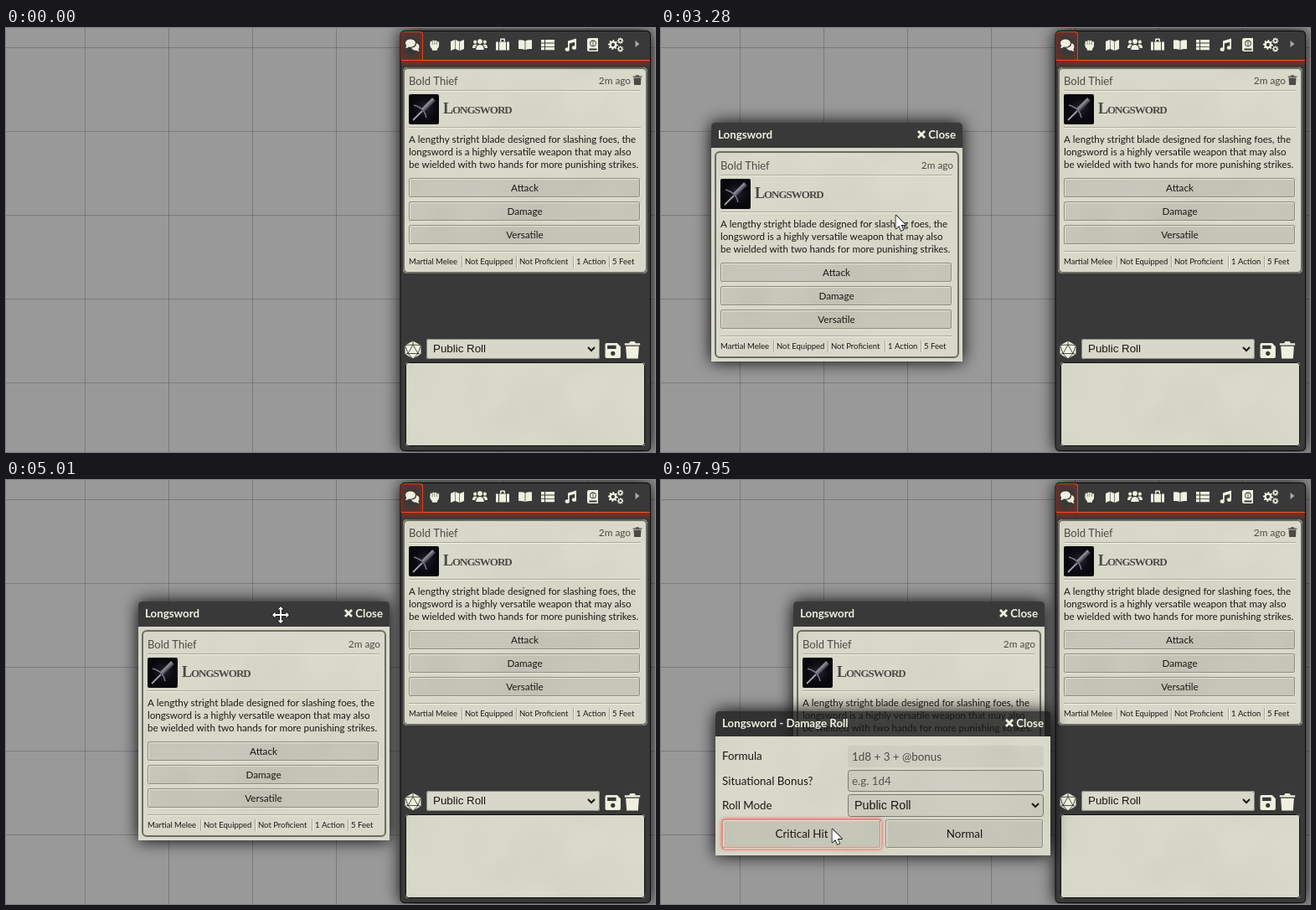
An HTML page with a canvas for the animation above (8 s loop, 775 by 506 pixels).

```html
<!DOCTYPE html>
<html lang="en">
<head>
<meta charset="utf-8">
<title>Chat card pop-out</title>
<style>
html, body { margin: 0; width: 100%; height: 100%; overflow: hidden; background: #999; }
canvas { display: block; }
</style>
</head>
<body>
<canvas id="stage" width="775" height="506"></canvas>
<script>
const ctx = document.getElementById('stage').getContext('2d');
const LOOP = 8000;
const CREAM = '#f0f0e0', INK = '#191813', SOFT = '#4b4a44', PANEL = '#393939';
const SANS = 'Lato, "Open Sans", sans-serif', ARIAL = '"Liberation Sans", Arial, sans-serif';

// ---- timing ----
// Progress in n equal jumps, the first at a and the last at b.
function ticks(t, a, b, n) {
  if (t < a) return 0;
  if (n < 2 || t >= b) return 1;
  return (Math.floor((t - a) / (b - a) * (n - 1) + 0.1) + 1) / n;
}

function along(pts, p) {
  const s = p * (pts.length - 1), i = Math.min(Math.floor(s), pts.length - 2), f = s - i;
  return [0, 1].map(k => Math.round(pts[i][k] + (pts[i + 1][k] - pts[i][k]) * f));
}

function place(moves, t) {
  let at = moves[0][3][0];
  for (const [a, b, n, pts] of moves) if (t >= a) at = along(pts, ticks(t, a, b, n));
  return at;
}

const pointerMoves = [
  [390, 870, 6, [[640, 331], [642, 175]]],
  [1750, 2330, 7, [[642, 175], [531, 317]]],
  [3090, 3860, 9, [[531, 317], [280, 223], [245, 150], [229, 114]]],
  [3950, 4050, 2, [[229, 114], [237, 128]]],
  [4550, 4550, 1, [[237, 128], [261, 128]]],
  [4630, 5010, 5, [[261, 128], [328, 161]]],
  [5600, 6080, 6, [[328, 161], [323, 352]]],
  [6280, 6280, 1, [[323, 352], [323, 353]]],
  [7560, 7950, 5, [[323, 353], [204, 416]]]
];
const popoutMoves = [
  [4550, 4550, 1, [[60, 113], [84, 113]]],
  [4630, 5010, 5, [[84, 113], [158, 145]]]
];

let mouse = [0, 0];
const hit = (x, y, w, h) => mouse[0] >= x && mouse[0] < x + w && mouse[1] >= y && mouse[1] < y + h;

// ---- drawing helpers ----
function text(s, x, y, size, color = INK, o = {}) {
  ctx.font = `${o.weight || 400} ${size}px ${o.family || SANS}`;
  ctx.textAlign = o.align || 'left';
  ctx.fillStyle = color;
  ctx.fillText(s, x, y);
}

function box(x, y, w, h, r) {
  ctx.beginPath();
  ctx.roundRect(x, y, w, h, r);
}

function fillBox(x, y, w, h, r, color) {
  box(x, y, w, h, r);
  ctx.fillStyle = color;
  ctx.fill();
}

function lineBox(x, y, w, h, r, color, width = 1) {
  box(x + width / 2, y + width / 2, w - width, h - width, r);
  ctx.strokeStyle = color;
  ctx.lineWidth = width;
  ctx.stroke();
}

// Shadow that falls only outside the box.
function glow(x, y, w, h, r, blur, color) {
  ctx.save();
  ctx.beginPath();
  ctx.rect(0, 0, 775, 506);
  ctx.roundRect(x, y, w, h, r);
  ctx.clip('evenodd');
  ctx.shadowColor = color;
  ctx.shadowBlur = blur;
  fillBox(x, y, w, h, r, '#000');
  ctx.restore();
}

function strokePath(d, x, y, color, width) {
  ctx.save();
  ctx.translate(x, y);
  ctx.strokeStyle = color;
  ctx.lineWidth = width;
  ctx.stroke(new Path2D(d));
  ctx.restore();
}

function groove(x, y, w) {
  ctx.fillStyle = '#aaa99b';
  ctx.fillRect(x, y, w, 1);
  ctx.fillStyle = '#eeeee2';
  ctx.fillRect(x, y + 1, w, 1);
}

const parchment = (() => {
  const c = document.createElement('canvas'), g = c.getContext('2d');
  c.width = 420;
  c.height = 300;
  g.fillStyle = '#d9d9ca';
  g.fillRect(0, 0, 420, 300);
  let seed = 11;
  const rnd = () => (seed = seed * 16807 % 2147483647) / 2147483647;
  for (let i = 0; i < 90; i++) {
    const x = rnd() * 420, y = rnd() * 300, r = 15 + rnd() * 40;
    const tone = i % 2 ? '255,255,240' : '130,130,105';
    const fade = g.createRadialGradient(x, y, 0, x, y, r);
    fade.addColorStop(0, `rgba(${tone},.035)`);
    fade.addColorStop(1, `rgba(${tone},0)`);
    g.fillStyle = fade;
    g.fillRect(x - r, y - r, 2 * r, 2 * r);
  }
  return c;
})();

function paper(x, y, w, h, r = 0) {
  ctx.save();
  box(x, y, w, h, r);
  ctx.clip();
  ctx.drawImage(parchment, x, y);
  ctx.restore();
}

// ---- icons on a 16 x 16 grid ----
const disc = (x, y, r) => `M${x - r} ${y}a${r} ${r} 0 1 1 ${2 * r} 0a${r} ${r} 0 1 1 ${-2 * r} 0z`;

function cog(x, y, r) {
  let d = '';
  for (let i = 0; i < 32; i++) {
    const a = i * Math.PI / 16, q = i % 4 < 2 ? r : r * 0.72;
    d += `${i ? 'L' : 'M'}${x + q * Math.cos(a)} ${y + q * Math.sin(a)}`;
  }
  return d + 'z' + disc(x, y, r * 0.35);
}

const shapes = {
  chat: 'M0 6a6 4.6 0 1 1 4.2 4.4Q2 12 0 12Q1 10.5 1.2 8.8Q0 7.6 0 6zM7 11.6A6 4.6 0 0 0 13 6q3.6 1.2 3.4 4.2q0 1.8-1 3l1 2.6q-2.6 0-3.6-1.2q-4 .6-5.8-3z',
  fist: 'M2 3h2.4v5h.6v-6h2.6v6h.6v-5.6h2.6v5.6h.6v-4.4h2.4v5.6q0 3-2.4 4.4v2h-7v-2q-3-2.4-3-5z',
  map: 'M0 4l5-2v11l-5 2zM5.6 2l4.8 2v11l-4.8-2zM11 4l5-2v11l-5 2z',
  users: disc(8, 4.5, 2.6) + disc(2.8, 5, 1.8) + disc(13.2, 5, 1.8) +
    'M3.8 13.4q0-5.4 4.2-5.4t4.2 5.4zM0 11.5q0-4 3-4q1.5 0 2 .8q-2 1.2-2.2 3.2zM16 11.5q0-4-3-4q-1.5 0-2 .8q2 1.2 2.2 3.2z',
  case: 'M5 4v-2.4q0-1 1-1h4q1 0 1 1v2.4h-1.5v-2h-3v2zM0 4.6h3v10h-3zM4 4.6h8v10h-8zM13 4.6h3v10h-3z',
  book: 'M0 2.5q5-.6 7.6 1v10.5q-3-1.4-7.6-1zM16 2.5q-5-.6-7.6 1v10.5q3-1.4 7.6-1z',
  list: [2, 6.4, 10.8].map(y => `M0 ${y}h4v3.5h-4zM5 ${y}h11v3.5h-11z`).join(''),
  music: 'M5 3.4L15 .6V11.4a2.6 2.2 0 1 1-1.8-2V4.8L6.8 6.6V13.4a2.6 2.2 0 1 1-1.8-2z',
  atlas: 'M3.5 0h10.5v16h-10.5q-2.5 0-2.5-2.5v-11q0-2.5 2.5-2.5zM3.5 12.6h9v1.8h-9z' +
    disc(8, 6.4, 3.8) + disc(8, 6.4, 2.9) + 'M7.6 3.5h.8v5.8h-.8z',
  cogs: cog(5.2, 8, 5.4) + cog(13, 3.8, 3.4) + cog(13, 12.4, 3.4),
  caret: 'M5 3l6 5l-6 5z',
  trash: 'M1 2h4l1-1.6h4l1 1.6h4v1.8h-14zM2 4.8h12l-.8 11.2h-10.4z',
  save: 'M1.5 .5h10.5l3.5 3.5v10q0 1.5-1.5 1.5h-12.5q-1.5 0-1.5-1.5v-12q0-1.5 1.5-1.5zM2.2 2.7h8.8v3.6h-8.8z' + disc(7.8, 10.8, 2.2),
  popout: 'M2 .5h13.5v13.5q0 1.5-1.5 1.5h-13.5v-6h2.2v3.8h10.6v-10.6h-11.3zM5 4.2h6.8v6.8l-2.2-2.2l-4.2 4.2l-2-2l4.2-4.2z'
};
for (const k in shapes) shapes[k] = new Path2D(shapes[k]);

function icon(name, cx, cy, size, color) {
  ctx.save();
  ctx.translate(cx - size / 2, cy - size / 2);
  ctx.scale(size / 16, size / 16);
  ctx.fillStyle = color;
  ctx.fill(shapes[name], 'evenodd');
  ctx.restore();
}

function eyeOff(x, y) {
  strokePath('M-7 0Q0-9 7 0Q0 9-7 0z', x, y, CREAM, 2);
  ctx.fillStyle = CREAM;
  ctx.fill(new Path2D(disc(x, y, 2.5)));
  strokePath('M-7-7L9 6', x, y, '#23221d', 2);
  strokePath('M-8-6.5L8 6.5', x, y, CREAM, 2);
}

function d20(x, y) {
  ctx.fillStyle = CREAM;
  ctx.fill(new Path2D(`M${x} ${y - 10.5}l9.5 5.2v10.6l-9.5 5.2l-9.5-5.2v-10.6z`));
  strokePath('M0-6L6 4.5H-6zM0-11V-6L9.5-5.5L6 4.5L9.5 5.5M0-6L-9.5-5.5L-6 4.5L-9.5 5.5M-6 4.5L0 11L6 4.5', x, y, PANEL, 0.9);
}

const chevron = (x, y) => strokePath('M-4-2L0 2L4-2', x, y, INK, 2);

// ---- widgets ----
function button(label, x, y, w, h, size) {
  const over = hit(x, y, w, h);
  if (over) glow(x, y, w, h, 3, 5, 'rgba(255,0,0,.75)');
  fillBox(x, y, w, h, 2, 'rgba(0,0,0,.09)');
  lineBox(x + 1, y + 1, w - 1, h - 1, 2, '#e6e6d8');
  lineBox(x, y, w - 1, h - 1, 2, over ? '#d98a7f' : '#8b8a7f');
  text(label, x + w / 2, y + h / 2 + size * 0.35, size, INK, { align: 'center' });
}

function swordArt(x, y) {
  ctx.save();
  ctx.translate(x, y);
  fillBox(0, 0, 36, 36, 2, '#08070c');
  const haze = ctx.createRadialGradient(20, 16, 1, 18, 18, 19);
  haze.addColorStop(0, '#262331');
  haze.addColorStop(1, 'rgba(8,7,12,0)');
  fillBox(0, 0, 36, 36, 2, haze);
  const steel = ctx.createLinearGradient(20, 8, 26, 14);
  steel.addColorStop(0, '#3a3843');
  steel.addColorStop(0.5, '#8f8d97');
  steel.addColorStop(1, '#35323d');
  ctx.fillStyle = steel;
  ctx.fill(new Path2D('M15 17L28 4L32 8L19 21z'));
  strokePath('M6 13Q13 15 17 19Q20 23 21 28', 0, 0, '#807d8a', 1.4);
  strokePath('M16 20L5 31', 0, 0, '#a3a1ab', 1.8);
  ctx.restore();
}

function heading(s, x, y) {
  ctx.save();
  ctx.font = '700 18px "Liberation Serif", "Noto Serif", serif';
  ctx.fontVariantCaps = 'small-caps';
  ctx.letterSpacing = '-1px';
  ctx.textAlign = 'left';
  ctx.fillStyle = SOFT;
  ctx.fillText(s, x, y);
  ctx.restore();
}

// Chat card; the origin is the left end of its text column.
function card(x, y, top, deletable) {
  const h = y + 246 - top;
  paper(x - 7, top, 292, h, 5);
  lineBox(x - 7, top, 292, h, 5, '#6d6b62', 2);
  text('Bold Thief', x, y + 21, 13, SOFT);
  text('2m ago', x + (deletable ? 265 : 278), y + 20, 11.8, SOFT, { align: 'right' });
  if (deletable) icon('trash', x + 273, y + 15, 12, SOFT);
  groove(x, y + 27, 277);
  swordArt(x, y + 32);
  heading('Longsword', x + 41, y + 55);
  groove(x, y + 71, 277);
  [
    'A lengthy stright blade designed for slashing foes, the',
    'longsword is a highly versatile weapon that may also',
    'be wielded with two hands for more punishing strikes.'
  ].forEach((s, i) => text(s, x, y + 90 + i * 15, 11.6));
  ['Attack', 'Damage', 'Versatile'].forEach((s, i) => button(s, x, y + 132 + i * 28, 277, 24, 11.7));
  groove(x, y + 219, 277);
  const tags = [['Martial Melee', 0], ['Not Equipped', 67], ['Not Proficient', 132], ['1 Action', 200], ['5 Feet', 243]];
  for (const [s, dx] of tags) {
    text(s, x + dx, y + 235, 9.5);
    if (!dx) continue;
    ctx.fillStyle = '#a5a497';
    ctx.fillRect(x + dx - 4, y + 225, 1, 14);
    ctx.fillStyle = '#f0f0e4';
    ctx.fillRect(x + dx - 3, y + 225, 1, 14);
  }
}

function frame(title, x, y, w, h, bar) {
  glow(x, y, w, h, [5, 5, 0, 0], 20, '#000');
  fillBox(x, y, w, 30, [5, 5, 0, 0], bar);
  paper(x, y + 30, w, h - 30);
  text(title, x + 8, y + 19, 13.3, CREAM, { weight: 700 });
  strokePath('M-4-4L4 4M4-4L-4 4', x + w - 49, y + 14, CREAM, 2.8);
  text('Close', x + w - 8, y + 19, 13.3, CREAM, { weight: 700, align: 'right' });
}

function table() {
  ctx.fillStyle = '#999';
  ctx.fillRect(0, 0, 775, 506);
  ctx.fillStyle = 'rgba(0,0,0,.2)';
  for (let x = 95; x < 775; x += 100) ctx.fillRect(x - 1, 0, 1, 506);
  for (let y = 23; y < 506; y += 100) ctx.fillRect(0, y, 775, 1);
}

function sidebar() {
  glow(471, 3, 299, 502, 5, 20, '#000');
  fillBox(471, 3, 299, 502, 5, PANEL);

  // tab bar
  const under = ctx.createLinearGradient(0, 38, 0, 47);
  under.addColorStop(0, 'rgba(220,30,0,.5)');
  under.addColorStop(1, 'rgba(220,30,0,0)');
  ctx.fillStyle = under;
  ctx.fillRect(472, 38, 297, 9);
  ctx.fillStyle = '#f2581c';
  ctx.fillRect(472, 38, 297, 1);
  ctx.save();
  box(471, 4, 27, 35, 3);
  ctx.clip();
  ctx.shadowColor = '#ff2000';
  ctx.shadowBlur = 9;
  lineBox(471, 4, 27, 36, 3, '#e0431a');
  lineBox(471, 4, 27, 36, 3, '#e0431a');
  ctx.restore();
  ['chat', 'fist', 'map', 'users', 'case', 'book', 'list', 'music', 'atlas', 'cogs']
    .forEach((n, i) => icon(n, 485 + i * 27, 20, n === 'users' || n === 'cogs' ? 18 : n === 'fist' ? 14 : 16, CREAM));
  icon('caret', 754, 19, 13, '#aaa');
  lineBox(470.5, 3, 299.5, 502, 5, '#0a0a0a');

  card(481, 47, 47, true);

  // chat controls
  d20(486, 384);
  fillBox(502, 371, 207, 24, 3, '#d7d7ca');
  lineBox(502, 371, 207, 24, 3, '#8a897e');
  text('Public Roll', 510, 387, 13.33, INK, { family: ARIAL });
  chevron(699, 383);
  icon('save', 725, 385, 19, CREAM);
  icon('trash', 748, 384, 21, CREAM);
  paper(477, 399, 286, 100, 3);
  lineBox(477, 399, 286, 100, 3, '#111');
}

function menu(open) {
  if (open <= 0) return;
  const h = 66 * open, over = hit(477, 293, 287, 32);
  ctx.save();
  box(476, 293, 288, h, 5);
  ctx.clip();
  fillBox(476, 293, 288, h, 5, '#23221d');
  lineBox(476, 293, 288, h, 5, '#000');
  if (over) {
    ctx.shadowColor = '#ff0000';
    ctx.shadowBlur = 8;
  }
  for (let i = 0; i < (over ? 2 : 1); i++) {
    icon('popout', 491, 309, 15, CREAM);
    text('Pop Out Message', 505, 314, 13.2, CREAM, { weight: 700 });
  }
  ctx.shadowBlur = 0;
  eyeOff(490, 341);
  text('Make Private', 505, 346, 13.2, CREAM, { weight: 700 });
  ctx.restore();
}

function popout([x, y], alpha) {
  if (!alpha) return;
  ctx.globalAlpha = alpha;
  frame('Longsword', x, y, 300, 285, PANEL);
  card(x + 11, y + 35, y + 34, false);
  ctx.globalAlpha = 1;
}

function field(y, h, bordered) {
  fillBox(223, y, 234, h, 3, 'rgba(0,0,0,.05)');
  if (bordered) lineBox(223, y, 234, h, 3, '#7a7971');
}

function dialog(alpha) {
  if (!alpha) return;
  ctx.globalAlpha = alpha;
  frame('Longsword - Damage Roll', 65, 276, 400, 172, 'rgba(22,22,22,.78)');
  ['Formula', 'Situational Bonus?', 'Roll Mode'].forEach((s, i) => text(s, 73, 334 + i * 29.5, 13.4));
  field(317, 26, false);
  text('1d8 + 3 + @bonus', 228, 335, 13.4, SOFT);
  field(346, 26, true);
  text('e.g. 1d4', 228, 364, 13.4, '#55544c');
  field(375, 27, true);
  text('Public Roll', 231, 393, 14.3, INK, { family: ARIAL });
  chevron(447, 388);
  button('Critical Hit', 73, 405, 190, 35, 13.4);
  button('Normal', 268, 405, 189, 35, 13.4);
  ctx.globalAlpha = 1;
}

// ---- pointer ----
const pointers = {
  arrow: new Path2D('M.5 .5V16.5L4.2 13L6.8 18.8L9.2 17.8L6.7 12.1H12z'),
  cross: new Path2D('M0-10L3.5-6.5H1V-1H6.5V-3.5L10 0L6.5 3.5V1H1V6.5H3.5L0 10L-3.5 6.5H-1V1H-6.5V3.5L-10 0L-6.5-3.5V-1H-1V-6.5H-3.5z')
};

function pointer(kind) {
  const [x, y] = mouse;
  if (kind === 'beam') {
    strokePath('M-3.5-8H-1L0-7L1-8H3.5M0-7V7M-3.5 8H-1L0 7L1 8H3.5', x + 0.5, y + 1, '#111', 1);
    return;
  }
  ctx.save();
  ctx.translate(x, y);
  ctx.lineJoin = 'round';
  ctx.lineWidth = 1.6;
  ctx.strokeStyle = '#111';
  ctx.stroke(pointers[kind]);
  ctx.fillStyle = '#fff';
  ctx.fill(pointers[kind]);
  ctx.restore();
}

function render(t) {
  const win = place(popoutMoves, t);
  mouse = place(pointerMoves, t);
  const shown = ticks(t, 2720, 2910, 3), asked = ticks(t, 7080, 7270, 3);

  table();
  sidebar();
  menu(ticks(t, 1360, 1550, 3) - shown);
  popout(win, shown);
  dialog(asked);

  if (t < 90) return;
  const onBar = shown === 1 && hit(win[0], win[1], 300, 30);
  const onInput = asked === 1 && hit(223, 346, 234, 26);
  pointer(onBar ? 'cross' : onInput ? 'beam' : 'arrow');
}

function tick() {
  render(performance.now() % LOOP);
  requestAnimationFrame(tick);
}
tick();
</script>
</body>
</html>
```
